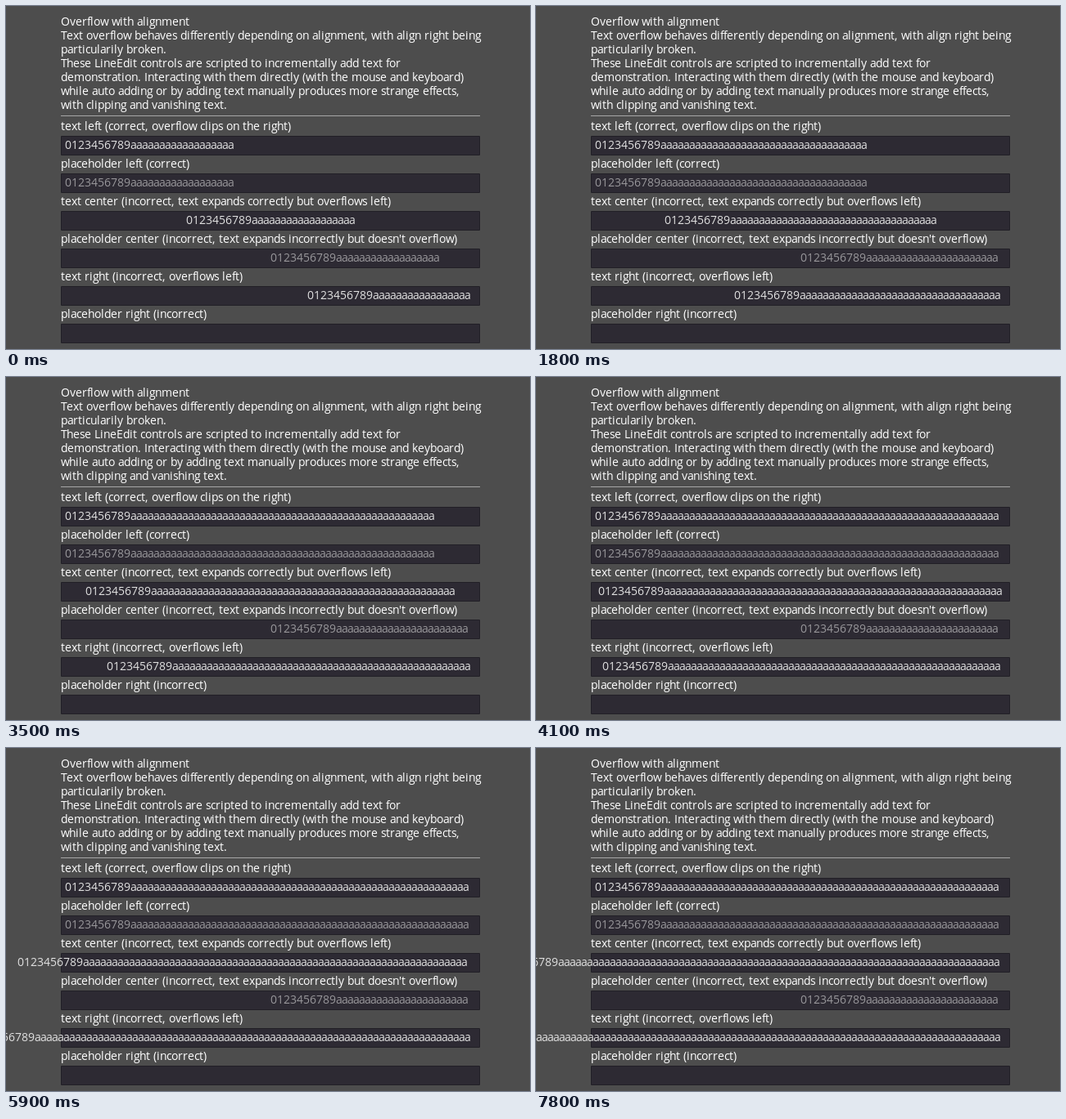
Recreate the animation shown at these times as an HTML page with a canvas. Size 640 by 420 pixels, loop 8000 ms.

```html
<!DOCTYPE html>
<html lang="en">
<head>
<meta charset="utf-8">
<title>Overflow with alignment</title>
<style>
  html, body { margin: 0; width: 640px; height: 420px; overflow: hidden; background: #4d4d4d; }
  canvas { display: block; }
</style>
</head>
<body>
<canvas id="stage" width="640" height="420"></canvas>
<script>
const ctx = document.getElementById('stage').getContext('2d');

const LOOP = 8000, TICK = 100;
const SKIPPED = [1, 6, 17, 27, 32, 45, 50, 57, 64, 79]; // ticks that keep the previous picture
const LEFT = 67, WIDTH = 512, PADDING = 5, TEXT_LIMIT = 569;

const INTRO = [
  'Overflow with alignment',
  'Text overflow behaves differently depending on alignment, with align right being',
  'particularily broken.',
  'These LineEdit controls are scripted to incrementally add text for',
  'demonstration. Interacting with them directly (with the mouse and keyboard)',
  'while auto adding or by adding text manually produces more strange effects,',
  'with clipping and vanishing text.'
];

// Each field: label, text colour, start of the text for a given text width
const TEXT = '#e0e0e0', PLACEHOLDER = 'rgba(224, 224, 224, 0.6)';
const left = () => LEFT + PADDING;
const center = width => LEFT + Math.trunc((WIDTH - width) / 2);
const right = width => LEFT + WIDTH - PADDING - width;
const FIELDS = [
  ['text left (correct, overflow clips on the right)', TEXT, left],
  ['placeholder left (correct)', PLACEHOLDER, left],
  ['text center (incorrect, text expands correctly but overflows left)', TEXT, center],
  ["placeholder center (incorrect, text expands incorrectly but doesn't overflow)", PLACEHOLDER, () => center(0)],
  ['text right (incorrect, overflows left)', TEXT, right],
  ['placeholder right (incorrect)', PLACEHOLDER, () => right(0)]
];

// Whole-pixel glyph advances of the interface font; all other glyphs take 8
const ADVANCES = { 3: "'", 4: ' filI.,()', 5: 't', 6: 'crs', 7: 'agkvxyTL', 10: 'w', 11: 'O', 13: 'm' };
const advance = {};
for (const [px, glyphs] of Object.entries(ADVANCES))
  for (const glyph of glyphs) advance[glyph] = +px;
const advanceOf = glyph => advance[glyph] || 8;
const widthOf = text => [...text].reduce((sum, glyph) => sum + advanceOf(glyph), 0);

function drawText(text, x, y, color, limit = Infinity) {
  ctx.fillStyle = color;
  for (const glyph of text) {
    const next = x + advanceOf(glyph);
    if (next > limit) break;
    ctx.fillText(glyph, x, y);
    x = next;
  }
}

function fillBox(x, y, w, h, color) {
  ctx.fillStyle = color;
  ctx.fillRect(x, y, w, h);
}

function drawField([label, color, startOf], y, content) {
  drawText(label, LEFT, y, '#fff');
  ctx.fillStyle = '#211f26';
  ctx.beginPath();
  ctx.roundRect(LEFT, y + 7, WIDTH, 24, 1);
  ctx.fill();
  fillBox(LEFT + 1, y + 8, WIDTH - 2, 22, '#2d2a33');
  drawText(content, startOf(widthOf(content)), y + 23, color, TEXT_LIMIT);
}

function draw(time) {
  let tick = Math.floor(time % LOOP / TICK);
  if (SKIPPED.includes(tick)) tick--;
  const content = '0123456789' + 'a'.repeat(18 + tick);

  fillBox(0, 0, 640, 420, '#4d4d4d');
  ctx.font = '14px "Open Sans", "Noto Sans", sans-serif';
  INTRO.forEach((line, i) => drawText(line, LEFT, 24 + i * 17, '#fff'));
  fillBox(LEFT, 134, WIDTH, 1, '#a6a6a6');
  FIELDS.forEach((field, i) => drawField(field, 152 + i * 46, content));
}

const start = performance.now();
function frame() {
  draw(performance.now() - start);
  requestAnimationFrame(frame);
}
frame();
</script>
</body>
</html>
```
